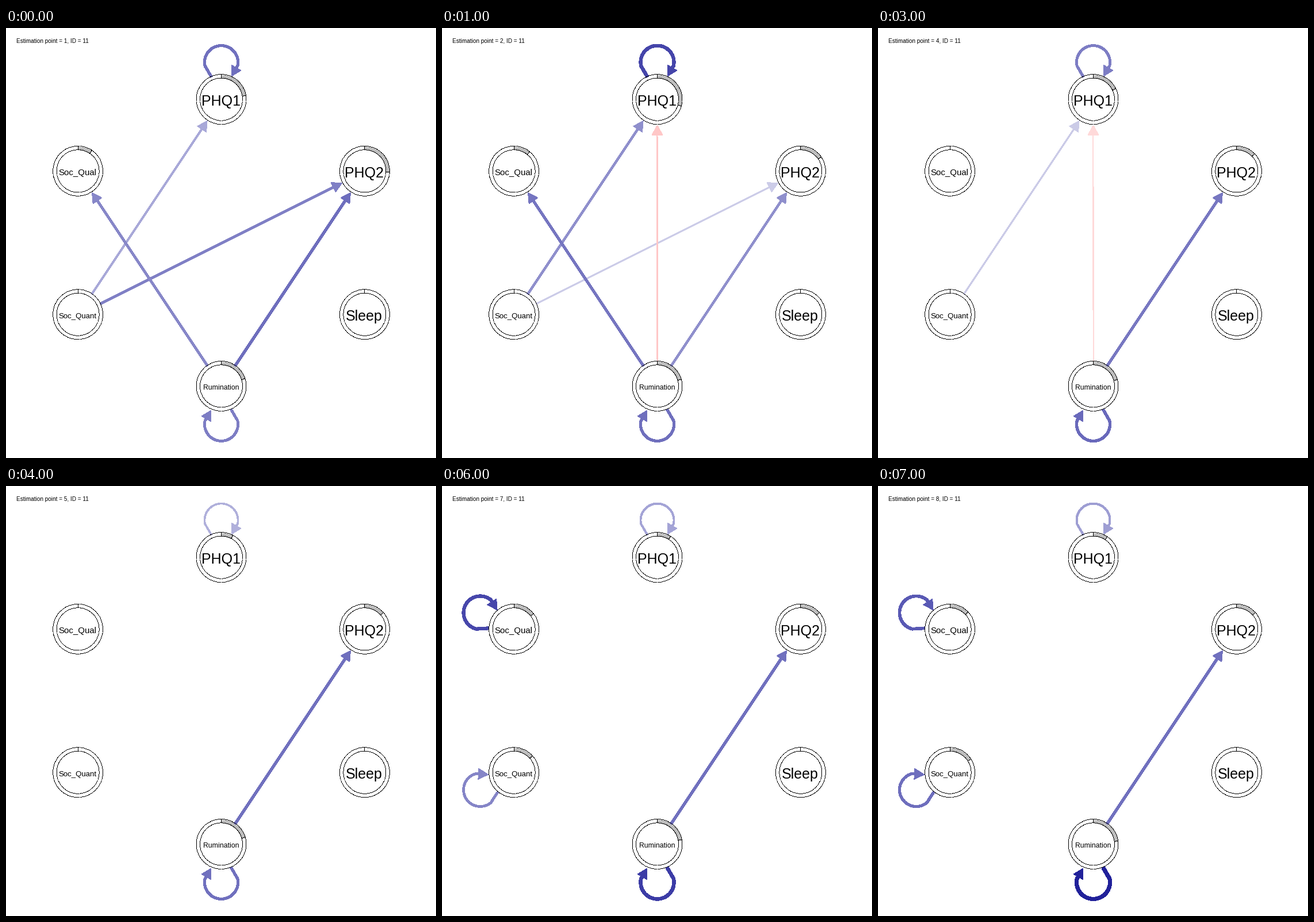
These frames come from a looping animation (748 by 748 pixels, 8000 ms). A matplotlib script:

```python
import numpy as np
import matplotlib.pyplot as plt
from matplotlib.animation import FuncAnimation

SIZE = 748
PX = 0.72  # points per pixel at 100 dpi
R_OUT, R_IN = 43.4, 37
MID = np.array([374, 374])
SPREAD = 249.4
STEPS = 8

plt.rcParams["font.family"] = ["Liberation Sans", "DejaVu Sans"]

# Clockwise from the top: name, font size, base of the ring share, gain per
# incoming strength
NODES = [
    ("PHQ1", 25, 0, .25),
    ("PHQ2", 25, 0, .24),
    ("Sleep", 25, 0, 0),
    ("Rumination", 12.2, .16, .08),
    ("Soc_Quant", 13.3, 0, .28),
    ("Soc_Qual", 15, 0, .2),
]

# (from, to, colour at full strength, {estimation point: strength});
# strengths in between are interpolated
BLUE, RED = (0, 0, 139), (255, 0, 0)
EDGES = [
    ("Soc_Quant", "PHQ1", BLUE, {1: .34, 2: .44, 3: .41, 5: 0}),
    ("Soc_Quant", "PHQ2", BLUE, {1: .5, 2: .2, 3: 0}),
    ("Rumination", "PHQ1", RED, {1: 0, 2: .22, 3: .3, 5: 0}),
    ("Rumination", "Soc_Qual", BLUE, {1: .47, 2: .54, 3: .38, 4: 0}),
    ("Rumination", "PHQ2", BLUE, {1: .57, 2: .44, 3: .51, 5: .56}),
    ("PHQ1", "PHQ1", BLUE, {1: .56, 2: .73, 3: .71, 5: .31, 8: .38}),
    ("Rumination", "Rumination", BLUE, {1: .51, 3: .62, 5: .56, 8: .87}),
    ("Soc_Qual", "Soc_Qual", BLUE, {5: 0, 7: .72, 8: .65}),
    ("Soc_Quant", "Soc_Quant", BLUE, {5: 0, 7: .48, 8: .57}),
]

fig = plt.figure(figsize=(SIZE / 100, SIZE / 100), dpi=100, facecolor="white")
ax = fig.add_axes([0, 0, 1, 1])


def place_nodes():
    """Six nodes on a circle, stretched to fill a square."""
    turn = np.arange(6) * np.pi / 3
    x, y = np.sin(turn) / np.sin(np.pi / 3), -np.cos(turn)
    spots = MID + SPREAD * np.column_stack([x, y])
    return {n[0]: spot for n, spot in zip(NODES, spots)}


POS = place_nodes()


def strength(keys, point):
    return np.interp(point, list(keys), list(keys.values()))


def clock(center, radius, turn):
    """Points at clockwise angles (radians) from the top."""
    return np.column_stack([center[0] + radius * np.sin(turn),
                            center[1] - radius * np.cos(turn)])


def hairline(points):
    """One-pixel black line without smoothing."""
    ax.plot(*np.round(points).T, ",", color="black")


def line(points, color, width):
    # unsmoothed strokes fill every touched pixel, so draw them thinner
    ax.plot(*np.transpose(points), color=color, lw=(width - 1) * PX,
            antialiased=False, solid_capstyle="butt", solid_joinstyle="round")


def fill(points, color):
    ax.fill(*np.transpose(points), color=color, lw=0, antialiased=False)


def arrow_head(tip, way, color, length=17, half=9.4):
    """Draw the head and return the middle of its base."""
    tip = tip - 0.7 * way
    base = tip - length * way
    side = half * np.array([-way[1], way[0]])
    fill([tip, base + side, base - side], color)
    return base


def straight(a, b, color, width):
    way = (b - a) / np.linalg.norm(b - a)
    base = arrow_head(b - R_OUT * way, way, color)
    line([a + R_OUT * way, base + way], color, width)


def loop(center, color, width):
    out = (center - MID) / np.linalg.norm(center - MID)
    right = np.array([-out[1], out[0]])

    def place(x, y):
        return center + x * right + y * out

    way = -0.5 * right - 0.866 * out
    base = arrow_head(place(17.2, 40.6), way, color)
    t = np.radians(np.linspace(-103, 103, 60))
    arc = [place(29 * np.sin(a), 65.5 + 29 * np.cos(a)) for a in t]
    line([place(-17.2, 40), *arc, base + way], color, width)


def node(name, size, share):
    center = POS[name]
    x, y = center
    fill(clock(center, R_OUT - 0.5, np.linspace(0, 2 * np.pi, 121)), "white")
    end = 2 * np.pi * share
    if end:
        part = np.linspace(0, end, 40)
        fill(np.vstack([clock(center, R_OUT - 0.5, part),
                        clock(center, R_IN + 0.5, part[::-1])]), "#bebebe")
    for r in (R_IN, R_OUT):
        hairline(clock(center, r, np.linspace(0, 2 * np.pi, int(2 * np.pi * r))))
    for turn in (0, end):
        hairline(clock(center, np.linspace(R_IN, R_OUT, 8), np.full(8, turn)))
    ax.text(x - 0.7, y + 0.36 * size + 1, name, fontsize=size * PX,
            ha="center", va="baseline")


def draw(step):
    point = step + 1
    ax.clear()
    ax.set_xlim(-0.5, SIZE - 0.5)
    ax.set_ylim(SIZE - 0.5, -0.5)
    ax.axis("off")
    incoming = dict.fromkeys(POS, 0)
    for start, end, full, keys in EDGES:
        s = strength(keys, point)
        if not s:
            continue
        color = tuple((255 + (c - 255) * s) / 255 for c in full)
        width = 1.6 + 6.3 * s
        if full == BLUE:
            incoming[end] += s
        if start == end:
            loop(POS[start], color, width)
        else:
            straight(POS[start], POS[end], color, width)
    for name, size, base, gain in NODES:
        node(name, size, base + gain * incoming[name])
    ax.text(17.3, 26, f"Estimation point = {point}, ID = 11",
            fontsize=10 * PX, va="baseline")
    return []


anim = FuncAnimation(fig, draw, frames=STEPS, init_func=lambda: [],
                     interval=1000, repeat=True, repeat_delay=0)
plt.show()
```
